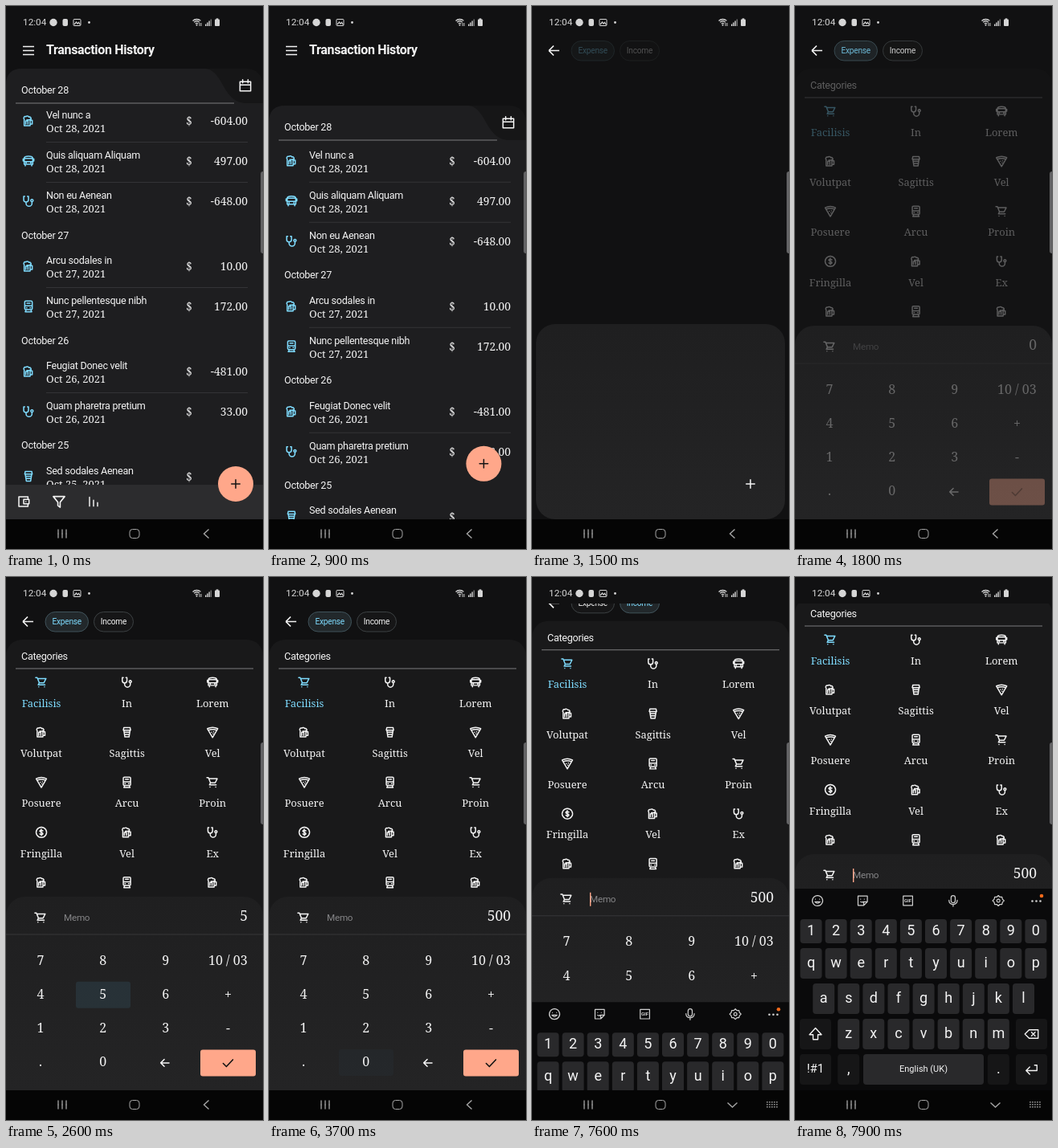
Animation, 320 px wide and 676 px high, one loop 8000 ms. Source, as an HTML page with a canvas:

```html
<!DOCTYPE html>
<html lang="en">
<head>
<meta charset="utf-8">
<title>Expense tracker</title>
<style>
html, body { margin: 0; width: 100%; height: 100%; overflow: hidden; background: #111112; }
canvas { display: block; width: 320px; height: 676px; }
</style>
</head>
<body>
<canvas id="stage"></canvas>
<script>
const W = 320, H = 676, LOOP = 8000, STEP = 100, NAV_TOP = 639;
const ORANGE = '#ffa78a', BLUE = '#7fdcff', WHITE = '#f4f4f4', BG = '#111112';
const canvas = document.getElementById('stage');
const ctx = canvas.getContext('2d');
const dpr = window.devicePixelRatio || 1;
canvas.width = W * dpr;
canvas.height = H * dpr;

const icons = {
  beer: 'M4 9v12h11V9M15 11h4v7h-4M7 12v6M11 12v6M4 9a3 3 0 0 1 3-5a4 4 0 0 1 6 1a2.5 2.5 0 0 1 2 5H9v2',
  bus: 'M4 18V7q0-4 8-4t8 4v11zM4 13h16M5 7h14M6 18v3M18 18v3M7 15.5h1M16 15.5h1M2 8v4M22 8v4',
  steth: 'M5 3H3v6a4.5 4.5 0 0 0 9 0V3h-2M7.5 13.5V16a5.5 5.5 0 0 0 11 0v-3M18.5 13a2.2 2.2 0 1 0-.1 0',
  train: 'M7 2h10q2 0 2 2v12q0 2-2 2H7q-2 0-2-2V4q0-2 2-2zM5 11h14M8 14.5h1M15 14.5h1M9 6h6M6 22h12M8 18l-2 4M16 18l2 4',
  cup: 'M6 3h12l1 5H5zM6 8l2 13h8l2-13M7 12h10M8 16h8',
  cart: 'M1 3h3l4 10h9l4-8H5M8 13l-2 4h13M7 21h.1M18 21h.1',
  pizza: 'M2 5q10-5 20 0L12 22zM4 8q8-3 16 0M10 12h.1M13 15h.1M14 11h.1',
  coin: 'M12 2a10 10 0 1 0 .1 0M15 9q-6-3-6 1q0 1 3 2t3 2q0 4-6 1M12 6v12',
  wallet: 'M20 7V3H3v18h17v-4M12 8h10v8H12zM16 12h.1',
  funnel: 'M2 3h20l-8 10v9l-4-3v-6z',
  bars: 'M4 3v18M12 9v12M20 14v7',
  calendar: 'M2 5h20v17H2zM2 11h20M7 1v6M17 1v6',
  plus: 'M12 3v18M3 12h18',
  back: 'M22 12H3M11 4l-8 8l8 8',
  check: 'M3 13l6 6L21 6',
  smile: 'M12 2a10 10 0 1 0 .1 0M8 9h.1M16 9h.1M7 14q5 6 10 0z',
  sticker: 'M3 3h18v11l-7 7H3zM21 14h-7v7M8 9h.1M15 9h.1M8 14q3 2 5 0',
  frame: 'M3 3h18v18H3z',
  mic: 'M12 2q4 0 4 4v6q0 4-4 4t-4-4V6q0-4 4-4M4 11q0 8 8 8t8-8M12 19v4',
  gear: 'M12 2l3 3l4 0l1 4l3 3l-3 3l-1 4h-4l-3 3l-3-3H5l-1-4l-3-3l3-3l1-4h4zM12 9a3 3 0 1 0 .1 0',
  shift: 'M12 2L2 13h6v8h8v-8h6z',
  erase: 'M8 5h15v14H8l-7-7zM12 9l6 6M18 9l-6 6',
  enter: 'M21 5v9H3M9 8l-6 6l6 6M17 5h4'
};
for (const name in icons) icons[name] = new Path2D(icons[name]);

const clamp = v => Math.min(1, Math.max(0, v));
const ramp = (t, a, b) => clamp((t - a) / (b - a));
const lerp = (a, b, p) => a + (b - a) * p;
const smooth = p => p * p * (3 - 2 * p);

function box(x, y, w, h, r, fill, stroke) {
  ctx.beginPath();
  ctx.roundRect(x, y, w, h, r);
  if (fill) { ctx.fillStyle = fill; ctx.fill(); }
  if (stroke) { ctx.strokeStyle = stroke; ctx.lineWidth = 1; ctx.stroke(); }
}
const dot = (x, y, r, color) => box(x - r, y - r, 2 * r, 2 * r, r, color);

function lines(color, width, ...paths) {
  ctx.strokeStyle = color;
  ctx.lineWidth = width;
  ctx.beginPath();
  for (const path of paths) path.forEach(([x, y], i) => i ? ctx.lineTo(x, y) : ctx.moveTo(x, y));
  ctx.stroke();
}
const rule = (x1, x2, y, color) => box(x1, y - .5, x2 - x1, 1, 0, color);

function icon(name, x, y, size, color = WHITE, weight = 2.3) {
  ctx.save();
  ctx.translate(x - size / 2, y - size / 2);
  ctx.scale(size / 24, size / 24);
  ctx.strokeStyle = color;
  ctx.lineWidth = weight;
  ctx.lineCap = ctx.lineJoin = 'round';
  ctx.stroke(icons[name]);
  ctx.restore();
}

function write(s, x, y, font, color = WHITE, align = 'left') {
  ctx.font = font;
  ctx.fillStyle = color;
  ctx.textAlign = align;
  ctx.textBaseline = 'middle';
  ctx.fillText(s, x, y);
}
const serif = (s, x, y, size, color, align) => write(s, x, y, `${size}px "Noto Serif", serif`, color, align);
const sans = (s, x, y, size, color, align) => write(s, x, y, `${size}px Roboto, sans-serif`, color, align);

// Without a condensed face, use a slightly smaller and tighter regular one.
const widthOf = font => (ctx.font = font, ctx.measureText('Transaction').width);
const hasCondensed = widthOf('condensed 40px Roboto, sans-serif') < widthOf('40px Roboto, sans-serif') - 5;
function narrow(s, x, y, size, color, align, weight = 400) {
  const px = hasCondensed ? size : size * .9;
  ctx.letterSpacing = hasCondensed ? '0px' : `${-size * .02}px`;
  write(s, x, y, `${weight} condensed ${px}px Roboto, sans-serif`, color, align);
  ctx.letterSpacing = '0px';
}

function faded(alpha, draw) {
  if (alpha <= 0) return;
  ctx.save();
  ctx.globalAlpha *= alpha;
  draw();
  ctx.restore();
}
function clipped(x, y, w, h, draw) {
  ctx.save();
  ctx.beginPath();
  ctx.rect(x, y, w, h);
  ctx.clip();
  draw();
  ctx.restore();
}

function statusBar() {
  sans('12:04', 21, 20.5, 11.8, '#d6d6d6');
  dot(59, 20.5, 4.7, '#d6d6d6');
  box(70.5, 16, 6.5, 9, 2, '#d6d6d6');
  box(84, 16.5, 9, 8, 1, null, '#d6d6d6');
  lines('#d6d6d6', 1.2, [[85, 23], [87.5, 20], [89, 22], [90.5, 20.5], [92.5, 23.5]]);
  dot(103.5, 20.5, 1.4, '#d6d6d6');
  ctx.strokeStyle = '#d6d6d6';
  ctx.lineWidth = 1.3;
  for (const r of [2.5, 5, 7.5]) {
    ctx.beginPath();
    ctx.arc(237.5, 24, r, -2.3, -.85);
    ctx.stroke();
  }
  dot(237.5, 23.8, 1, '#d6d6d6');
  lines('#d6d6d6', .9, [[241, 21], [241, 25]], [[243, 25], [243, 21]]);
  for (let i = 0; i < 4; i++) box(248 + i * 2.2, 22.5 - i * 2, 1.4, 2.5 + i * 2, 0, i < 3 ? '#d6d6d6' : '#777');
  box(260, 16.5, 6, 8.5, 1, '#d6d6d6');
  box(261.7, 15.4, 2.6, 2, 0, '#d6d6d6');
}

function navBar(typing) {
  box(0, NAV_TOP, W, H - NAV_TOP, 0, '#050505');
  for (const x of [65, 70, 75]) rule(x - .6, x + .6, 657, '#9b9b9b'), box(x - .7, 651.5, 1.4, 11, 0, '#9b9b9b');
  box(154, 651.5, 12, 11, 3.5, null, '#a5a5a5');
  if (!typing) return lines('#a5a5a5', 1.4, [[252.5, 651.5], [246.5, 657], [252.5, 662.5]]);
  lines('#a5a5a5', 1.4, [[243.5, 654.5], [249.5, 660], [255.5, 654.5]]);
  for (let i = 0; i < 15; i++) box(292 + i % 5 * 3, 653 + Math.floor(i / 5) * 3, 1.8, 1.6, 0, '#8a8a8a');
}

const groups = [
  ['October 28', 105, [['beer', 'Vel nunc a', '-604.00'], ['bus', 'Quis aliquam Aliquam', '497.00'], ['steth', 'Non eu Aenean', '-648.00']]],
  ['October 27', 286, [['beer', 'Arcu sodales in', '10.00'], ['train', 'Nunc pellentesque nibh', '172.00']]],
  ['October 26', 417, [['beer', 'Feugiat Donec velit', '-481.00'], ['steth', 'Quam pharetra pretium', '33.00']]],
  ['October 25', 547.5, [['cup', 'Sed sodales Aenean', '']]]
];

function historyRows() {
  groups.forEach(([day, top, items], g) => {
    if (g) narrow(day, 19, top, 14);
    items.forEach(([name, title, amount], i) => {
      const y = top + 31.5 + i * 50;
      icon(name, 28, y + 6.5, 16, BLUE);
      narrow(title, 50, y, 14);
      serif(`Oct ${day.slice(-2)}, 2021`, 50, y + 17, 13);
      serif('$', 228, y + 8, 13.5, WHITE, 'center');
      serif(amount, 301, y + 8, 13.8, WHITE, 'right');
      if (i < items.length - 1) rule(50, 301, y + 33, '#333336');
    });
  });
}

function historySheet(slide) {
  ctx.save();
  ctx.translate(0, slide);
  box(0, 78, W, 600, [20, 20, 0, 0], '#161617');
  ctx.fillStyle = '#1e1e20';
  ctx.beginPath();
  ctx.moveTo(0, 98);
  ctx.quadraticCurveTo(0, 78, 20, 78);
  ctx.lineTo(246, 78);
  ctx.bezierCurveTo(272, 78, 268, 121, 300, 121);
  ctx.lineTo(W, 121);
  ctx.lineTo(W, 680);
  ctx.lineTo(0, 680);
  ctx.fill();
  narrow('October 28', 19, 105, 14);
  icon('calendar', 298, 99, 16);
  clipped(0, 122, W, 560, () => {
    ctx.translate(0, slide * .08);
    historyRows();
  });
  rule(12, 284, 121, '#7c7c7e');
  ctx.restore();
  box(0, 596 + slide, W, 44, 0, '#2c2c2e');
  icon('wallet', 22, 617 + slide, 16);
  icon('funnel', 66, 617 + slide, 17);
  icon('bars', 109, 617 + slide, 15);
}

function menuArrow(p) {
  const end = (x1, y1, x2, y2) => [lerp(x1, x2, p), lerp(y1, y2, p)];
  lines(WHITE, 1.7,
    [end(21, 50.5, 21, 55.5), end(35, 50.5, 27, 49.5)],
    [[21, 55.5], end(35, 55.5, 34, 55.5)],
    [end(21, 60.5, 21, 55.5), end(35, 60.5, 27, 61.5)]);
}

function chip(x, w, label, on, press) {
  box(x, 43.5, w, 24.5, 12.2, on ? '#22282b' : '#161617', on ? '#40535b' : '#3c4143');
  faded(press, () => box(x, 43.5, w, 24.5, 12.2, '#24353d', '#52666e'));
  narrow(label, x + w / 2, 56, 11.3, on ? BLUE : WHITE, 'center');
}

function chips(t) {
  const income = t >= 5700;
  const press = t >= 5600 ? 1 - ramp(t, 5600, 6000) : 0;
  chip(49, 53.5, 'Expense', !income, 0);
  chip(109.5, 49, 'Income', income, press);
}

const categories = [
  ['cart', 'Facilisis'], ['steth', 'In'], ['bus', 'Lorem'],
  ['beer', 'Volutpat'], ['cup', 'Sagittis'], ['pizza', 'Vel'],
  ['pizza', 'Posuere'], ['train', 'Arcu'], ['cart', 'Proin'],
  ['coin', 'Fringilla'], ['beer', 'Vel'], ['steth', 'Ex'],
  ['beer', ''], ['train', ''], ['beer', '']
];

function categorySheet() {
  box(0, 78, W, 600, [20, 20, 0, 0], '#19191a');
  narrow('Categories', 19, 99, 14);
  rule(12, 308, 114, '#7c7c7e');
  categories.forEach(([name, label], i) => {
    const x = 44 + i % 3 * 106.6, y = 131 + Math.floor(i / 3) * 62.3;
    const color = i ? WHITE : BLUE;
    icon(name, x, y, 15.5, color);
    serif(label, x, y + 27, 12.9, color, 'center');
  });
}

function card(x, y, w, h, r) {
  const shade = ctx.createLinearGradient(0, 398, 0, NAV_TOP);
  shade.addColorStop(0, '#1f1f20');
  shade.addColorStop(1, '#242425');
  box(x, y, w, h, r, shade);
}

const keypad = [
  ['7', '8', '9', '10 / 03'], ['4', '5', '6', '+'],
  ['1', '2', '3', '-'], ['.', '0', 'back', 'check']
];
const presses = [[2400, 1], [3100, 3], [3400, 3]];

function keypadContent(t) {
  icon('cart', 43, 424, 15.5);
  narrow('Memo', 72, 424.5, 13, '#858587');
  const amount = t < 2500 ? '0' : t < 3200 ? '5' : t < 3500 ? '50' : '500';
  serif(amount, 301, 423, 17.5, WHITE, 'right');
  rule(0, W, 445, '#363638');
  for (const [start, row] of presses) {
    const glow = Math.min(ramp(t, start - 100, start + 100), 1 - ramp(t, start + 150, start + 350));
    faded(glow, () => box(87, 461.5 + row * 42.2, 68, 33, 3, '#2a373e'));
  }
  box(242, 588.5, 69, 33, 3, ORANGE);
  keypad.forEach((row, r) => row.forEach((key, c) => {
    const x = 43 + c * 77.8, y = 478 + r * 42.3;
    if (key === 'back') icon(key, x - 1, y, 13, WHITE, 2.8);
    else if (key === 'check') icon(key, x, y, 16, '#111');
    else serif(key, x, y, 16, WHITE, 'center');
  }));
}

function floatingButton(t) {
  const move = smooth(ramp(t, 800, 1200)), grow = ramp(t, 1200, 1500), settle = ramp(t, 1500, 1600);
  const cx = lerp(286, 167, move), cy = lerp(595, 434, move);
  const stretch = (from, mid, to) => lerp(lerp(from, mid, grow), to, settle);
  const shape = [stretch(cx - 22, 5, 0), stretch(cy - 22, 396, 398),
    stretch(44, 310, 320), stretch(44, 243, 241)];
  const radius = t < 1600 ? lerp(22, 24, grow) : [24, 24, 0, 0];
  clipped(0, 0, W, NAV_TOP, () => {
    card(...shape, radius);
    faded(1 - ramp(t, 900, 1500), () => box(...shape, radius, ORANGE));
  });
  const px = lerp(cx, 272, grow), py = lerp(cy, 595, grow);
  const white = ramp(t, 900, 1200);
  faded(1 - white, () => icon('plus', px, py, 14, '#151515', 2.6));
  faded(white * (1 - ramp(t, 1500, 1700)), () => icon('plus', px, py, 14, WHITE, 2.6));
}

function key(label, x, y, w, h, dark) {
  box(x - w / 2, y - h / 2, w, h, 4, dark ? '#161617' : '#29292b');
  if (icons[label]) icon(label, x, y, 18, WHITE, 1.8);
  else sans(label, x, y, label.length > 3 ? 11 : label.length > 1 ? 15 : 18, WHITE, 'center');
}

function keyboard() {
  box(0, 388, W, 252, 0, '#0a0a0b');
  ['smile', 'sticker', 'frame', 'mic', 'gear'].forEach((name, i) => icon(name, 28 + i * 56.3, 403, 15.5, '#d0d0d0', 1.9));
  write('GIF', 140.6, 403.5, 'bold 6px Roboto, sans-serif', '#d0d0d0', 'center');
  for (const x of [295.5, 300.5, 305.5]) dot(x, 403.5, 1.3, '#d0d0d0');
  dot(307, 397, 2.3, '#f26a1b');
  const row = (chars, x, y, h) => [...chars].forEach((c, i) => key(c, x + i * 31.1, y, 27, h));
  row('1234567890', 20, 441, 30);
  row('qwertyuiop', 20, 481, 38);
  row('asdfghjkl', 35.7, 525, 38);
  row('zxcvbnm', 66.7, 569, 38);
  key('shift', 25.5, 569, 39, 38, true);
  key('erase', 294.5, 569, 39, 38, true);
  key('!#1', 25.5, 613, 39, 38, true);
  key(',', 66.7, 613, 27, 38, true);
  key('English (UK)', 160, 613, 150, 38);
  key('.', 253.3, 613, 27, 38, true);
  key('enter', 294.5, 613, 39, 38, true);
}

function draw(t) {
  ctx.setTransform(dpr, 0, 0, dpr, 0, 0);
  box(0, 0, W, H, 0, BG);
  const typing = t >= 7600;
  const rise = typing ? 1 - (1 - ramp(t, 7500, 7900)) ** 2 : 0;

  clipped(0, 33, W, NAV_TOP - 33, () => {
    ctx.translate(0, -53 * rise);
    menuArrow(ramp(t, 1050, 1500));
    faded(1 - ramp(t, 1140, 1440), () => narrow('Transaction History', 50, 55.5, 17.8, WHITE, 'left', 700));
    faded(ramp(t, 1350, 1900), () => chips(t));
    if (t < 1400) historySheet(414 * ramp(t, 750, 1550) ** 2 * 3.16);
    const content = ramp(t, 1600, 2200);
    faded(content, categorySheet);
    floatingButton(t);
    faded(content, () => keypadContent(t));
    if (typing) box(72, 416, 1.4, 17, 0, ORANGE);
  });

  if (typing) clipped(0, 0, W, NAV_TOP, () => {
    ctx.translate(0, 251 * (1 - rise));
    keyboard();
  });
  statusBar();
  navBar(typing);
  box(317, 206, 6, 102, 3, '#626264');
}

const began = performance.now();
function tick() {
  const t = (performance.now() - began) % LOOP;
  draw(Math.floor(t / STEP) * STEP);
  requestAnimationFrame(tick);
}
tick();
</script>
</body>
</html>
```
